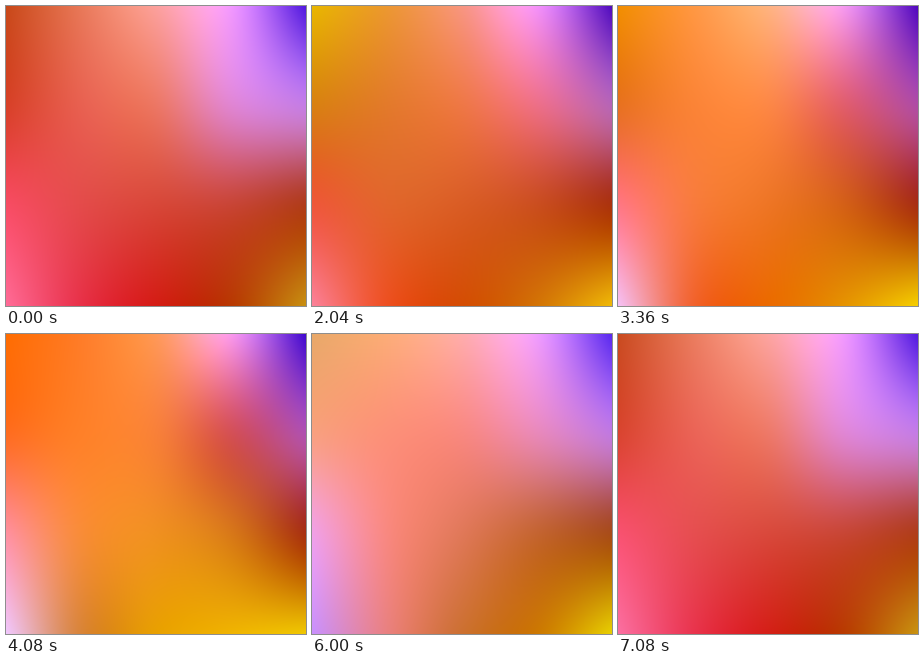
Write an HTML page with a canvas that moves like this. It is 300 by 300 pixels and loops after 7.2 s.

```html
<!DOCTYPE html>
<html lang="en">
<head>
<meta charset="utf-8">
<title>Drifting gradient</title>
<style>
  html, body { margin: 0; width: 100%; height: 100%; overflow: hidden; }
  canvas { display: block; width: 300px; height: 300px; }
</style>
</head>
<body>
<canvas id="stage" width="300" height="300"></canvas>
<script>
const SIZE = 300, LOOP = 7200, STEP = 120;
const COLS = 5, ROWS = 4;

// Gradient mesh: handle colours, top row to bottom row, at moments of the loop
const moments = [
  { t: 0, rows: [
    '#c84818 #e87858 #fca09c #f298ff #5018e0',
    '#d84028 #e86050 #ec7664 #e084d0 #c47ce4',
    '#f84c64 #e44a4a #d84638 #c84434 #b03c18',
    '#ff6c98 #e83048 #d41c14 #b83800 #c89010'] },
  { t: 1080, rows: [
    '#e8b000 #d87808 #f0605c #f484ff #4010d0',
    '#e08000 #d06810 #dc6038 #e87090 #c080d4',
    '#dc4c10 #cc5c14 #c85c20 #c45028 #b03808',
    '#ff4848 #d05820 #bc6008 #c87008 #e09810'] },
  { t: 2760, rows: [
    '#e8a800 #fca850 #ffbc98 #f49cf4 #5808b8',
    '#d87820 #f48440 #fc8850 #ec6c80 #b050a4',
    '#ff6468 #f46c40 #e86028 #d05018 #a83010',
    '#f8b0e0 #ff4c28 #e84400 #dc7800 #f8d000'] },
  { t: 4080, rows: [
    '#ff6c00 #ff7c28 #ff9858 #fa98ec #4008d0',
    '#ff6c20 #ff8028 #f88038 #d45054 #b050b0',
    '#ff90a0 #f88c38 #f09020 #d87818 #a83010',
    '#f0c8ff #d88438 #e8a000 #f0b400 #f0c800'] },
  { t: 4920, rows: [
    '#ff6c10 #ff8840 #ff9468 #fcacf0 #3810e0',
    '#ff8440 #ff8c50 #f48458 #e07078 #b070c8',
    '#ff9ca0 #f89058 #e88c34 #d07c28 #a04408',
    '#e8b8ff #dc9050 #e09818 #eca800 #f0cc00'] },
  { t: 6000, rows: [
    '#e8a868 #fcac78 #ffacac #f09cff #5828f0',
    '#f8a080 #fc9078 #f88880 #e888b8 #c078e0',
    '#f0a0e8 #f88880 #e07858 #c46430 #a84c18',
    '#c890ff #e88080 #cc7030 #cc7800 #e8d000'] }
];

const channels = hex => [1, 3, 5].map(i => parseInt(hex.slice(i, i + 2), 16));
const keys = moments.map(({ t, rows }) =>
  ({ t, v: rows.flatMap(row => row.split(' ').flatMap(channels)) }));

// Keys wrap around the loop in both directions
function keyAt(i) {
  const n = keys.length, lap = Math.floor(i / n), key = keys[i - lap * n];
  return { t: key.t + lap * LOOP, v: key.v };
}

// Smooth periodic curve through the keys, for every handle channel
function meshAt(t) {
  let i = keys.length - 1;
  while (keys[i].t > t) i--;
  const [a, b, c, d] = [-1, 0, 1, 2].map(k => keyAt(i + k));
  const h = c.t - b.t, u = (t - b.t) / h, u2 = u * u, u3 = u2 * u;
  return b.v.map((p, k) => {
    const q = c.v[k];
    const m = (q - a.v[k]) / (c.t - a.t) * h;
    const n = (d.v[k] - p) / (d.t - b.t) * h;
    return (2 * u3 - 3 * u2 + 1) * p + (u3 - 2 * u2 + u) * m
      + (3 * u2 - 2 * u3) * q + (u3 - u2) * n;
  });
}

// Spline weights of each handle for every pixel along one axis
function weights(count) {
  return Array.from({ length: SIZE }, (_, px) => {
    const s = (px + 0.5) / SIZE * (count - 1);
    const i = Math.floor(s), u = s - i, w = new Array(count).fill(0);
    const cubic = [
      (-u + 2 * u * u - u ** 3) / 2,
      (2 - 5 * u * u + 3 * u ** 3) / 2,
      (u + 4 * u * u - 3 * u ** 3) / 2,
      (u ** 3 - u * u) / 2
    ];
    cubic.forEach((c, k) => {
      const j = i + k - 1;
      if (j < 0) { w[0] += 2 * c; w[1] -= c; }
      else if (j >= count) { w[count - 1] += 2 * c; w[count - 2] -= c; }
      else w[j] += c;
    });
    return w;
  });
}

const ctx = document.getElementById('stage').getContext('2d');
const image = ctx.createImageData(SIZE, SIZE);
const wx = weights(COLS), wy = weights(ROWS);
const line = new Float64Array(COLS * 3);

function paint(t) {
  const mesh = meshAt(t), out = image.data;
  let o = 0;
  for (let y = 0; y < SIZE; y++) {
    for (let k = 0; k < line.length; k++) {
      line[k] = 0;
      for (let r = 0; r < ROWS; r++) line[k] += wy[y][r] * mesh[r * line.length + k];
    }
    for (let x = 0; x < SIZE; x++) {
      const w = wx[x];
      for (let ch = 0; ch < 3; ch++) {
        let sum = 0;
        for (let c = 0; c < COLS; c++) sum += w[c] * line[c * 3 + ch];
        out[o++] = sum;
      }
      out[o++] = 255;
    }
  }
  ctx.putImageData(image, 0, 0);
}

const start = performance.now();
let shown = -1;

function tick() {
  const elapsed = Math.max(0, performance.now() - start) % LOOP;
  const t = Math.floor(elapsed / STEP) * STEP;
  if (t !== shown) paint(shown = t);
  requestAnimationFrame(tick);
}
tick();
</script>
</body>
</html>
```
